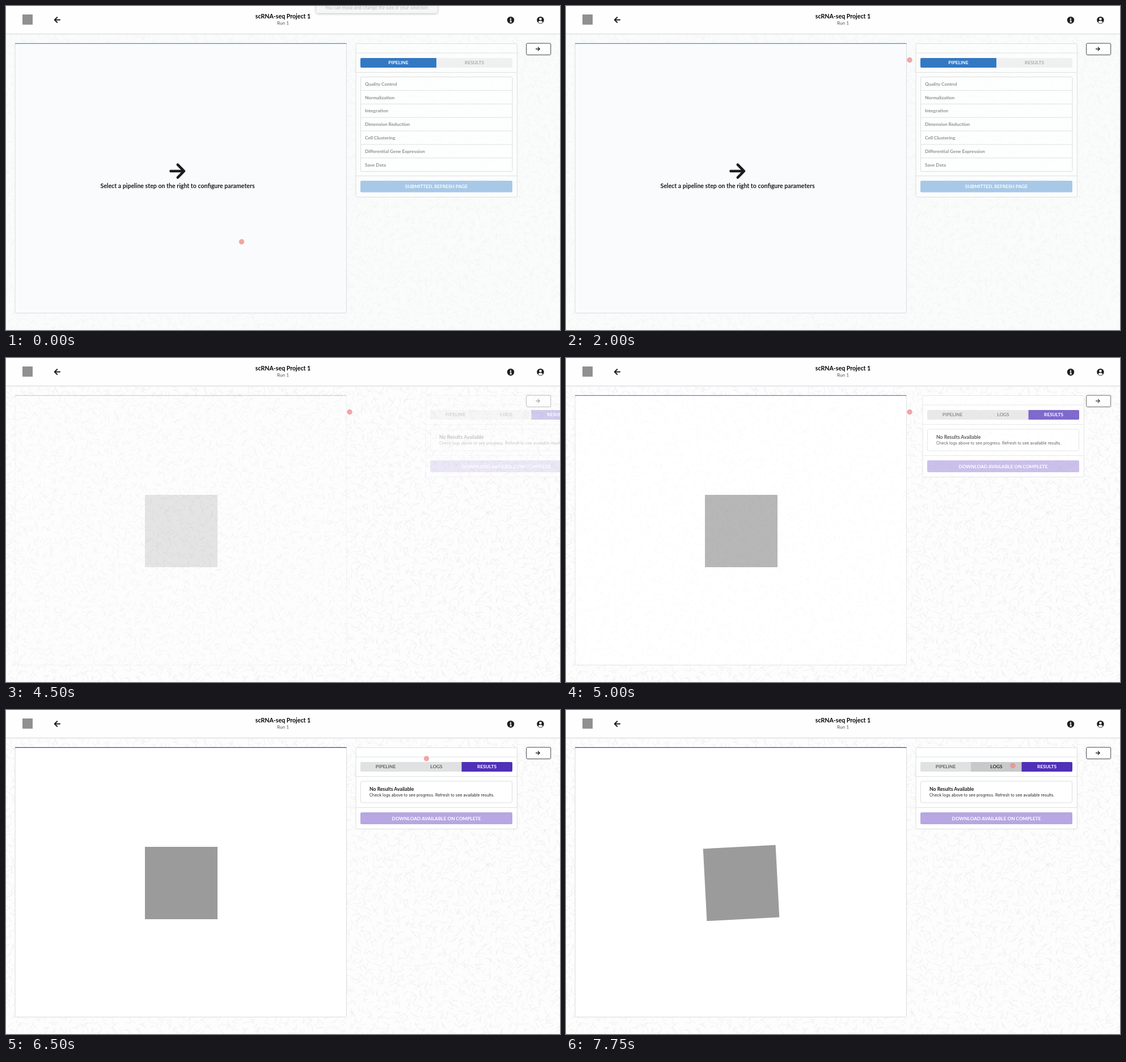
An HTML page for the animation above (8 s loop, 977 by 573 pixels).

```html
<!DOCTYPE html>
<html lang="en">
<head>
<meta charset="utf-8">
<style>
  html, body { margin: 0; width: 100%; height: 100%; overflow: hidden; }
  svg { display: block; width: 977px; height: 573px; font: 8.3px Lato, sans-serif; }
  .bold { font-weight: 700; }
  .mid { text-anchor: middle; }
  .big { font-size: 10.6px; }
  .plain { font-family: Inter, sans-serif; }
  .frame { fill: #fff; fill-opacity: .55; stroke: #dcdddd; }
  .solid { fill-opacity: 1; }
  .rule { stroke: #dfe0e0; fill: none; }
  .arrow { fill: none; stroke: currentColor; stroke-width: 4.6; stroke-linejoin: round; stroke-linecap: round; }
</style>
</head>
<body>
<svg viewBox="0 0 977 573">
  <defs>
    <path id="arrow" class="arrow" d="M-12 0H11M.3 -11.3L11.5 0L.3 11.3"/>
    <filter id="shadow" x="-10%" y="-50%" width="120%" height="250%">
      <feDropShadow dx="0" dy="1" stdDeviation="2" flood-opacity=".3"/>
    </filter>
  </defs>

  <rect id="backdrop" width="977" height="573"/>
  <path id="squiggles" fill="none" stroke-width=".65"/>

  <rect y="49" width="977" height="2" fill="#eff0f0"/>
  <rect width="977" height="49" fill="#fefefe"/>
  <path d="M0 49H977" stroke="#dfe1e1"/>
  <rect x="29" y="15" width="18" height="18" fill="#8f918f"/>
  <g color="#1b1c1d">
    <use href="#arrow" transform="translate(90.3 24.5) scale(-.4 .4)"/>
    <text x="488.5" y="22" class="bold mid big">scRNA-seq Project 1</text>
    <text x="488.5" y="32.6" class="mid" fill="#555">Run 1</text>
    <circle cx="890" cy="25" r="6.2" fill="#1b1c1d"/>
    <path d="M888.4 24h1.9v4M888.3 28.2h3.6M889.2 21.7h1.8" fill="none" stroke="#fff" stroke-width="1.4"/>
    <circle cx="942.5" cy="25" r="6.2" fill="#1b1c1d"/>
    <circle cx="942.5" cy="23" r="2.3" fill="#fff"/>
    <path d="M938.4 28.6q1 -2.3 4.1 -2.3t4.1 2.3a5.2 5.2 0 0 1 -8.2 0z" fill="#fff"/>
  </g>

  <g id="setup">
    <rect x="16" y="66.5" width="584.5" height="476.5" rx="2" fill="#fafbfc" stroke="#d9dbdd"/>
    <path d="M16 66.4H600.5" stroke="#4a8ed6" stroke-width="1.3"/>
    <g id="hint" color="#1b1c1d" fill="#1b1c1d">
      <use href="#arrow" transform="translate(302.5 292)"/>
      <text x="302.5" y="322" class="bold mid big">Select a pipeline step on the right to configure parameters</text>
    </g>
    <rect x="617" y="66.5" width="284.5" height="271.5" rx="2" class="frame"/>
    <path d="M617 83H901M617 117.5H901M617 300.5H901" class="rule"/>
    <rect x="625" y="92" width="268" height="17" rx="2" fill="#eff0f0"/>
    <path d="M759 92V109H627a2 2 0 0 1 -2 -2V94a2 2 0 0 1 2 -2z" fill="#3378c2"/>
    <text x="692" y="103.2" class="bold mid" fill="#fff">PIPELINE</text>
    <text x="826" y="103.2" class="bold mid" fill="#aaa">RESULTS</text>
    <rect x="625.5" y="125.5" width="267.5" height="167" rx="2" class="frame"/>
    <g id="steps"></g>
    <rect x="625" y="309" width="268" height="20.5" rx="2" fill="#a8c8e8"/>
    <text x="759" y="322.2" class="bold mid" fill="#fff">SUBMITTED, REFRESH PAGE</text>
  </g>

  <g id="results">
    <rect x="16" y="66.5" width="584.5" height="476.5" rx="2" fill="#fff" stroke="#d9dadb"/>
    <path d="M16 66.4H600.5" stroke="#5636bd" stroke-width="1.3"/>
    <rect id="emblem" x="245" y="242" width="128" height="128" fill="#9b9b9b"/>
    <g id="panel">
      <rect x="617" y="66.5" width="284.5" height="144" rx="2" class="frame solid"/>
      <path d="M617 83H901M617 117.5H901M617 172.5H901" class="rule"/>
      <rect x="625" y="92" width="268" height="17" rx="2" fill="#e0e1e2"/>
      <rect id="logs" x="714" y="92" width="89.5" height="17" fill="#c8c9ca"/>
      <path d="M803.5 92H891a2 2 0 0 1 2 2V107a2 2 0 0 1 -2 2H803.5z" fill="#4f30b8"/>
      <text x="669.5" y="103.2" class="bold mid" fill="#5f6061">PIPELINE</text>
      <text id="logsLabel" x="759" y="103.2" class="bold mid">LOGS</text>
      <text x="848" y="103.2" class="bold mid" fill="#fff">RESULTS</text>
      <rect x="625.5" y="126" width="267" height="38" rx="2" class="frame solid"/>
      <text x="641" y="143" class="bold" font-size="8.7" fill="#1b1c1d">No Results Available</text>
      <text x="641" y="153" class="plain" font-size="6.98" fill="#1f2021">Check logs above to see progress. Refresh to see available results.</text>
      <rect x="625" y="181" width="268" height="21" rx="2" fill="#b7a7e2"/>
      <text x="759" y="194.5" class="bold mid" fill="#fff">DOWNLOAD AVAILABLE ON COMPLETE</text>
    </g>
  </g>

  <g id="next" color="#1b1c1d">
    <rect x="917.7" y="66" width="43" height="20.5" rx="2" fill="#fff" stroke="#444"/>
    <use href="#arrow" transform="translate(938 76) scale(.28)"/>
  </g>

  <g id="notice">
    <rect x="547" y="-20" width="214" height="32.5" rx="4" fill="#f5f6f6" filter="url(#shadow)"/>
    <text x="653.5" y="5.8" class="plain mid" font-size="7.38" fill="#b9baba">You can move and change the size of your selection</text>
  </g>
  <circle id="pointer" r="4.7" fill="#f08c8c" fill-opacity=".78"/>
</svg>

<script>
const LOOP = 8000, STEP = 250, SWITCH = 4250;
const el = id => document.getElementById(id);
const set = (id, attrs) => {
  for (const name in attrs) el(id).setAttribute(name, attrs[name]);
};

// Linear interpolation through [time, value] pairs
function track(t, keys) {
  if (t <= keys[0][0]) return keys[0][1];
  for (let i = 1; i < keys.length; i++) {
    const [t0, v0] = keys[i - 1], [t1, v1] = keys[i];
    if (t <= t1) return v0 + (v1 - v0) * (t - t0) / (t1 - t0);
  }
  return keys[keys.length - 1][1];
}

// Short zigzag strokes, one per jittered grid cell
function drawSquiggles() {
  const cell = 9.5;
  let seed = 11, d = '';
  const random = () => (seed = seed * 16807 % 2147483647) / 2147483647;
  const jitter = at => (at + (random() - .5) * 5).toFixed(1);
  for (let y = 50; y < 580; y += cell) {
    for (let x = 0; x < 985; x += cell) {
      const angle = random() * Math.PI * 2;
      d += `M${jitter(x)} ${jitter(y)}`;
      for (let i = 0; i < 5; i++) {
        const bend = angle + (i % 2 ? .6 : -.6);
        d += `l${(2.5 * Math.cos(bend)).toFixed(1)} ${(2.5 * Math.sin(bend)).toFixed(1)}`;
      }
    }
  }
  set('squiggles', { d });
}

function drawSteps() {
  const names = ['Quality Control', 'Normalization', 'Integration', 'Dimension Reduction',
    'Cell Clustering', 'Differential Gene Expression', 'Save Data'];
  el('steps').innerHTML = names.map((name, i) => {
    const y = 125.5 + i * 23.87;
    return (i ? `<path d="M625 ${y}H893" class="rule"/>` : '') +
      `<text x="633" y="${y + 15.2}" class="bold" fill="#8d8e8e">${name}</text>`;
  }).join('');
}

const pointerX = [[500, 415.5], [750, 445], [1000, 510], [1250, 575], [1500, 606],
  [6250, 606], [6500, 741.5], [7250, 775], [7500, 785], [7750, 788]];
const pointerY = [[500, 417], [750, 367], [1000, 256], [1250, 147], [1500, 95.5],
  [6250, 95.5], [6500, 86], [7250, 91], [7500, 98], [7750, 98.5]];
const fade = [[4250, .05], [4500, .25], [4750, .5], [5000, .72], [5250, .86], [5500, .94], [5750, 1]];
const slide = [[4250, 250], [4500, 123], [4750, 48], [5000, 12], [5250, 0]];
const buttonFade = [[4250, .15], [4500, .35], [5000, .8], [5500, 1]];

function render(t) {
  const loaded = t >= SWITCH, phase = t / 1000 * Math.PI * 2;
  set('backdrop', { fill: loaded ? '#fdfdfd' : '#fafbfb' });
  set('squiggles', { stroke: loaded ? '#e8e9e9' : '#f0f1f1' });
  set('setup', { display: loaded ? 'none' : 'inline' });
  set('results', { display: loaded ? 'inline' : 'none', opacity: track(t, fade) });
  set('hint', { transform: `translate(${5.5 * (1 - Math.cos(phase))} 0)` });
  set('emblem', { transform: `rotate(${3 * Math.sin(phase)} 309 306)` });
  set('panel', { transform: `translate(${track(t, slide)} 0)` });
  set('next', { opacity: loaded ? track(t, buttonFade) : 1 });
  set('logs', { opacity: track(t, [[7250, 0], [7500, .6], [7750, 1]]) });
  set('logsLabel', { fill: t < 7500 ? '#5f6061' : '#2b2c2d' });
  set('notice', { display: t < STEP ? 'inline' : 'none' });
  set('pointer', { cx: track(t, pointerX), cy: track(t, pointerY) });
}

drawSquiggles();
drawSteps();
const start = performance.now();
function tick() {
  const t = (performance.now() - start) % LOOP;
  render(Math.floor(t / STEP) * STEP);
  requestAnimationFrame(tick);
}
tick();
</script>
</body>
</html>
```
